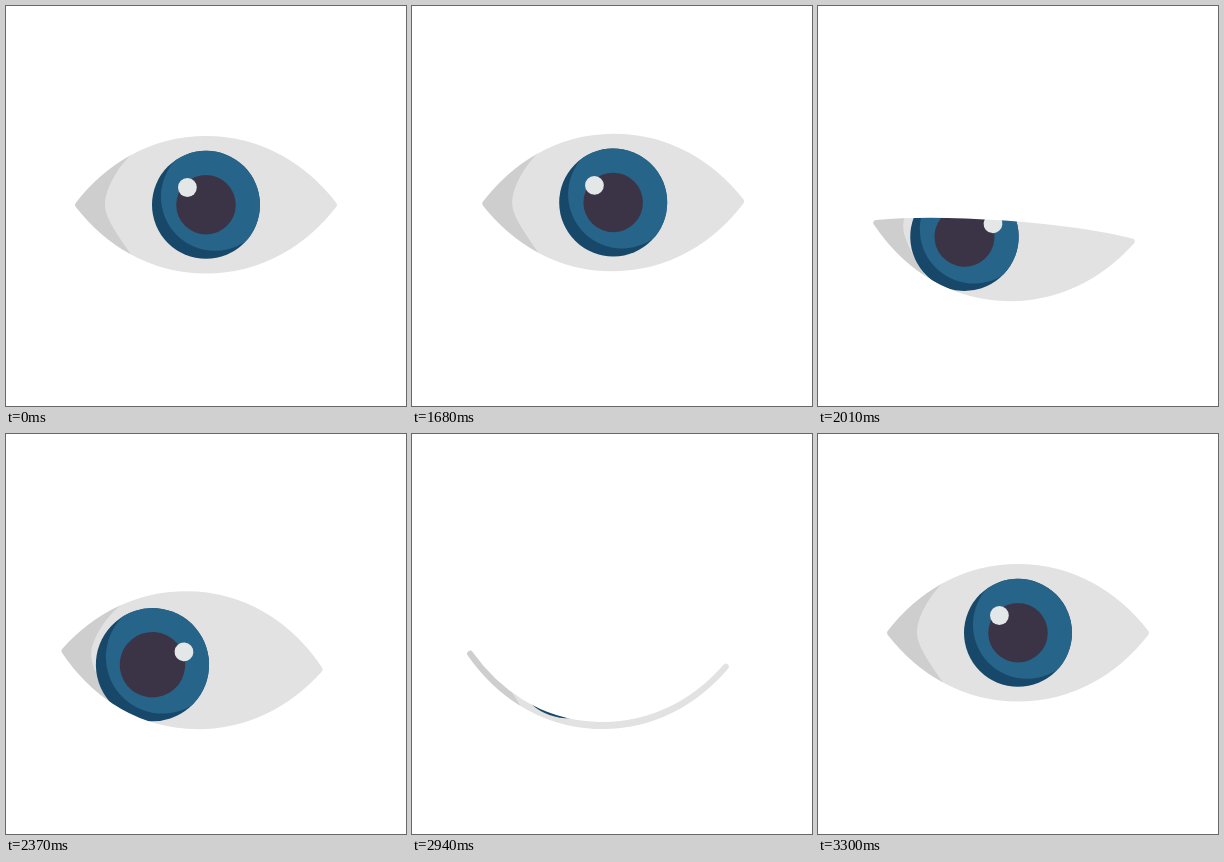
Animation, 400 px wide and 400 px high, one loop 3390 ms. Source, as an HTML page with a canvas:

```html
<!DOCTYPE html>
<html lang="en">
<head>
<meta charset="utf-8">
<title>Blinking eye</title>
<style>
  html, body { margin: 0; width: 100%; height: 100%; overflow: hidden; background: #fff; }
  canvas { display: block; width: 400px; height: 400px; }
</style>
</head>
<body>
<canvas id="stage" width="400" height="400"></canvas>
<script>
const ctx = document.getElementById('stage').getContext('2d');

const LOOP = 3390, STEP = 30;
const START = 1500, SPAN = 1800;   // the glance plays forward, then mirrored
const TILT = 4.15 * Math.PI / 180;
const LID = 3;                     // radius of the rounded lid edge

const mix = (a, b, k) => a + (b - a) * k;

function smooth(u, from, to) {
  const k = Math.min(1, Math.max(0, (u - from) / (to - from)));
  return k * k * (3 - 2 * k);
}

const cubic = (a, b, s) =>
  3 * s * (1 - s) * (1 - s) * a + 3 * s * s * (1 - s) * b + s * s * s;

// Winds up in the opposite direction before moving
function windUp(u, length) {
  const x = u / length;
  if (x <= 0) return 0;
  if (x >= 1) return 1;
  let lo = 0, hi = 1;
  for (let i = 0; i < 30; i++) {
    const mid = (lo + hi) / 2;
    if (cubic(0.85, 0.74, mid) < x) lo = mid; else hi = mid;
  }
  return cubic(-0.6, 1, lo);
}

function disc(x, y, r, color) {
  ctx.fillStyle = color;
  ctx.beginPath();
  ctx.arc(x, y, r, 0, Math.PI * 2);
  ctx.fill();
}

// lid: -1 is open, 1 is shut
function eyeball(lid) {
  const tip = 128, h = 65.8;
  ctx.beginPath();
  ctx.moveTo(-tip, 0);
  ctx.bezierCurveTo(-100, 36 * lid, -57, h * lid, 0, h * lid);
  ctx.bezierCurveTo(57, h * lid, 100, 36 * lid, tip, 0);
  ctx.bezierCurveTo(100, 36, 57, h, 0, h);
  ctx.bezierCurveTo(-57, h, -100, 36, -tip, 0);
  ctx.closePath();
  ctx.fillStyle = ctx.strokeStyle = '#e2e2e2';
  ctx.lineWidth = LID * 2;
  ctx.lineJoin = 'round';
  ctx.fill();
  ctx.stroke();
}

function shade() {
  ctx.fillStyle = '#cecece';
  ctx.beginPath();
  ctx.moveTo(-140, -51);
  ctx.lineTo(-74, -51);
  ctx.bezierCurveTo(-88, -38, -101, -16, -101, 0);
  ctx.bezierCurveTo(-101, 13, -89, 29, -75, 50);
  ctx.lineTo(-140, 50);
  ctx.fill();
}

function iris(look, grow) {
  const r = mix(54, 56.6, grow), k = r / 54;
  ctx.save();
  ctx.translate(-39.1 * look, 7.35 * look);
  disc(0, 0, r, '#184869');
  ctx.save();
  ctx.beginPath();
  ctx.arc(0, 0, r, 0, Math.PI * 2);
  ctx.clip();
  disc(9 * k, -8 * k, r, '#276489');
  ctx.restore();
  disc(0, 0, mix(29.8, 32.8, grow), '#3b3447');
  disc(mix(-18.6, 27.2, look) + 3.3 * grow, mix(-17.3, -15, look), 9.4, '#e4e7e8');
  ctx.restore();
}

function draw(time) {
  let u = Math.floor(time / STEP) * STEP - START;
  u = Math.max(0, Math.min(u, SPAN - u));

  const move = windUp(u, 362);
  const look = smooth(u, 240, 415);
  const grow = smooth(u, 450, 780);
  const shut = smooth(u, 240, 367) - smooth(u, 367, 630);

  ctx.clearRect(0, 0, 400, 400);
  ctx.save();
  ctx.translate(200 - 14 * move, 198.8 + 27.4 * move);
  ctx.rotate(TILT * windUp(u, 430));
  eyeball(2 * shut - 1);
  ctx.globalCompositeOperation = 'source-atop';
  shade();
  iris(look, grow);
  ctx.restore();
}

const begin = performance.now();
function frame() {
  draw((performance.now() - begin) % LOOP);
  requestAnimationFrame(frame);
}
frame();
</script>
</body>
</html>
```
